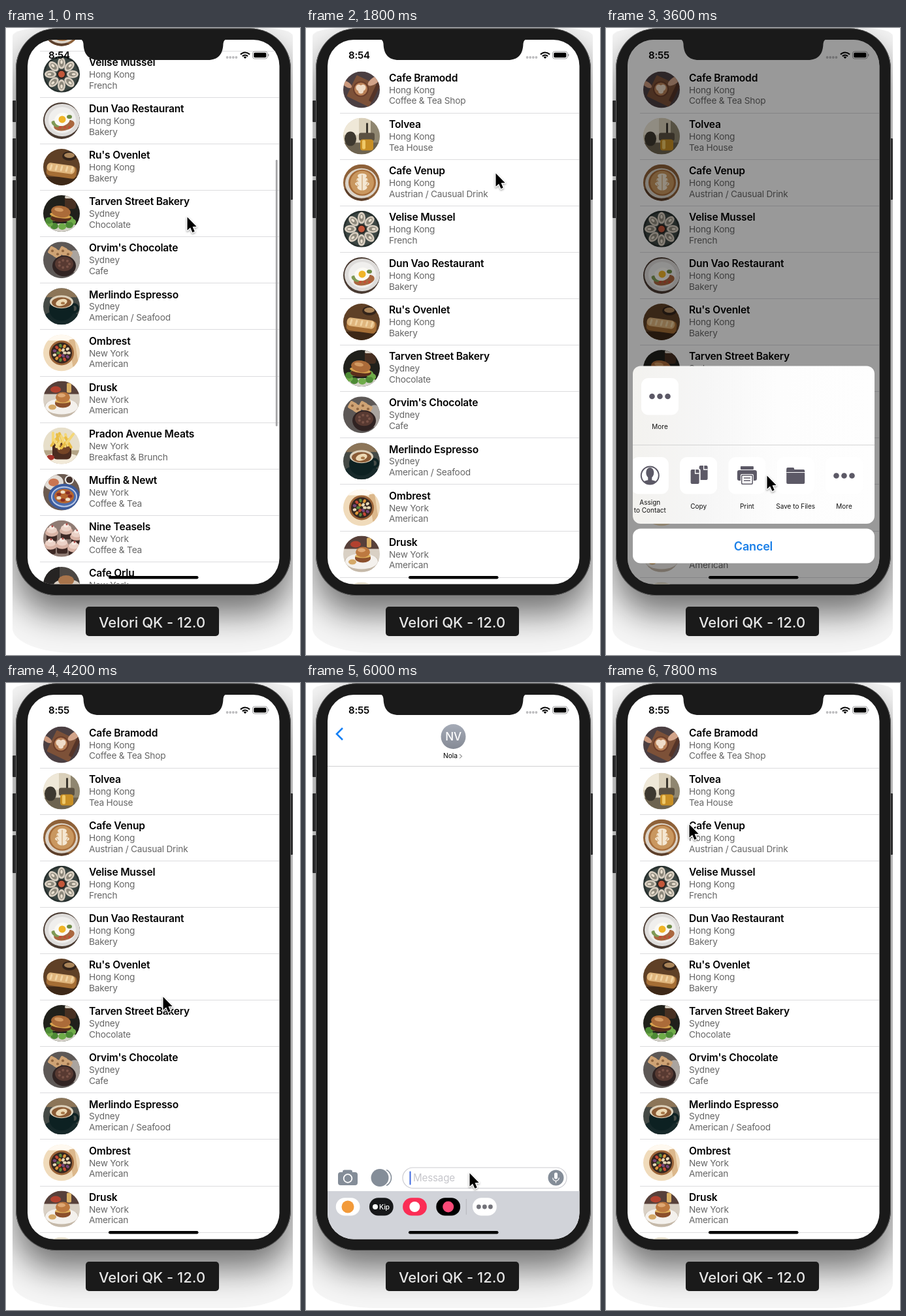
These frames come from a looping animation (450 px wide and 960 px high, 8000 ms). An HTML page with a canvas:

```html
<!DOCTYPE html>
<html lang="en">
<head>
<meta charset="utf-8">
<style>
html, body { margin: 0; width: 100%; height: 100%; overflow: hidden; background: #fff; }
canvas { display: block; }
</style>
</head>
<body>
<canvas id="stage" width="450" height="960"></canvas>
<script>
const ctx = document.getElementById('stage').getContext('2d');
const STEP = 600, LOOP = 8000, ROW = 71.1, DARK = '#1a1a1a', ICON = '#5c5966', SLATE = '#848d98';

// scene, pointer x, pointer y, scroll offset
const steps = [
  ['list', 277, 289, 237], ['list', 243, 222, 16], ['list', 209, 153, 0], ['list', 290, 222, 0],
  ['list', 348, 287, 0], ['share', 300, 690, 0], ['share', 246, 685, 89], ['list', 240, 480, 0],
  ['launch', 235, 283], ['inbox', 240, 290], ['chat', 250, 750], ['chat', 235, 752],
  ['chat', 180, 480], ['list', 127, 216, 0]
];

function disc(color, x, y, rx, ry = rx, turn = 0) {
  ctx.fillStyle = color;
  ctx.beginPath();
  ctx.ellipse(x, y, rx, ry, turn, 0, Math.PI * 2);
  ctx.fill();
}
function box(color, x, y, w, h, r = 0) {
  ctx.fillStyle = color;
  ctx.beginPath();
  ctx.roundRect(x, y, w, h, r);
  ctx.fill();
}
function slab(color, x, y, w, h, turn, r = 2) {
  ctx.save();
  ctx.translate(x, y);
  ctx.rotate(turn);
  box(color, -w / 2, -h / 2, w, h, r);
  ctx.restore();
}
function line(color, width, ...points) {
  ctx.strokeStyle = color;
  ctx.lineWidth = width;
  ctx.beginPath();
  for (let i = 0; i < points.length; i += 2) ctx.lineTo(points[i], points[i + 1]);
  ctx.stroke();
}
function arc(color, width, x, y, r, from = 0, to = Math.PI * 2) {
  ctx.strokeStyle = color;
  ctx.lineWidth = width;
  ctx.beginPath();
  ctx.arc(x, y, r, from, to);
  ctx.stroke();
}
function text(str, x, y, size, weight = 400, color = '#000', align = 'left', spacing = -0.2) {
  ctx.font = `${weight} ${size}px Inter, sans-serif`;
  ctx.letterSpacing = spacing + 'px';
  ctx.fillStyle = color;
  ctx.textAlign = align;
  ctx.fillText(str, x, y);
}
function ringOf(count, radius, draw) {
  for (let i = 0; i < count; i++) {
    const a = i / count * Math.PI * 2;
    draw(Math.cos(a) * radius, Math.sin(a) * radius, a, i);
  }
}
function clipped(x, y, w, h, r, draw) {
  ctx.save();
  ctx.beginPath();
  ctx.roundRect(x, y, w, h, r);
  ctx.clip();
  draw();
  ctx.restore();
}
function dots(color, x, y, r, gap, count = 3) {
  for (let i = 0; i < count; i++) disc(color, x + (i - (count - 1) / 2) * gap, y, r);
}

// Dishes are drawn around (0, 0) inside a circle of radius 28
const dishes = {
  board() {
    box('#4b3f42', -28, -28, 56, 56);
    slab('#7d5138', 2, 2, 38, 36, 0.45);
    slab('#553428', 22, 0, 6, 40, 0.45);
    disc('#d3a48a', 20, -14, 12, 5, -0.6);
    disc('#c9977c', -22, -8, 8, 4, 0.6);
    disc('#6b3d2a', -1, -1, 12);
    disc('#b98057', -1, -1, 10);
    disc('#f0dcc8', -4, -3, 4.5, 5, -0.4);
    disc('#f0dcc8', 2, -3, 4.5, 5, 0.4);
    disc('#f0dcc8', -1, 2, 4, 4);
  },
  tea() {
    box('#d9cfb9', -28, -28, 56, 56);
    box('#efe8d8', -28, -28, 24, 26);
    box('#8f8670', 14, -28, 14, 40);
    box('#6d6350', -28, 10, 56, 18);
    disc('#3d382f', -17, 4, 9, 11);
    box('#3a352d', 7, -20, 3, 18);
    box('#5b5142', -4, -5, 24, 12, 3);
    box('#c88f25', -2, 5, 20, 17, 4);
    box('#f0c968', 1, 6, 5, 14, 2);
  },
  latte() {
    box('#8e6139', -28, -28, 56, 56);
    slab('#5c3f2b', -12, 20, 50, 10, 0.4);
    disc('#dcd4c9', 0, 1, 25, 23);
    disc('#a66c38', 1, 0, 21, 20);
    disc('#c9975f', 1, 0, 18);
    for (let i = 0; i < 4; i++) {
      disc('#f4e7d2', 1, -10 + i * 6, 7 + i * 2 - (i > 2 ? 5 : 0), 4);
      arc('#c9975f', 1, 1, -14 + i * 6, 9, 0.3, 2.8);
    }
    line('#c9975f', 1, 1, -12, 1, 14);
  },
  oysters() {
    box('#28312f', -28, -28, 56, 56);
    disc('#3d4744', 0, 0, 25);
    ringOf(8, 17, (x, y, a) => {
      disc('#d8cec0', x, y, 9, 6, a);
      disc('#8d887b', x, y, 6, 3.5, a);
      disc('#e9dfcf', x * 1.1, y * 1.1, 3, 1.8, a);
    });
    disc('#2a2320', 0, 0, 7);
    disc('#c2573a', 0, 0, 5);
  },
  egg() {
    box('#4a3b32', -28, -28, 56, 56);
    disc('#dedcda', 1, -1, 27, 25);
    disc('#f0efed', 1, -1, 21, 20);
    disc('#a9673f', 4, 7, 16, 8, -0.2);
    disc('#7f9a55', -9, 5, 7, 4, 0.5);
    disc('#fbfaf4', 1, -2, 12, 10, -0.3);
    disc('#f0b428', 1, -2, 5.5);
    dots('#c54d35', 5, 10, 2, 7);
    disc('#6d8b43', 12, -6, 4, 3);
  },
  loaf() {
    box('#5f4026', -28, -28, 56, 56);
    box('#3d2817', -28, 15, 56, 13);
    disc('#33241a', 12, -17, 11, 7);
    disc('#a98459', 12, -18, 8, 4);
    slab('#a56e35', 0, 6, 46, 19, 0.14, 6);
    slab('#e0b67d', -1, 2, 43, 13, 0.14, 6);
    for (let i = -2; i < 3; i++) slab('#f0d3a3', i * 8, 2 + i, 3, 9, 0.3);
  },
  burger() {
    box('#20201b', -28, -28, 56, 56);
    box('#473022', 5, -27, 17, 20, 4);
    box('#d8d2c6', 5, -27, 17, 4, 2);
    disc('#d5d2c9', 2, 22, 26, 7);
    ringOf(9, 14, (x, y, a, i) => disc(i % 2 ? '#4d8a35' : '#6fac49', x * 1.3 - 2, 13 + y * 0.5, 6, 5));
    disc('#5a2e1c', -1, 7, 16, 6);
    disc('#d7a24c', -2, 3, 16, 4, 0.15);
    disc('#ab6b39', -1, -3, 15, 9, 0.15);
    disc('#d39a62', -4, -6, 7, 3, 0.15);
  },
  chocolate() {
    box('#5d5856', -28, -28, 56, 56);
    disc('#aaa49f', 20, 2, 12, 17);
    for (let i = 0; i < 4; i++) {
      slab('#cfa374', -14 + i * 8, -14 + i % 2 * 5, 11, 12, 0.5);
      disc('#8f6540', -14 + i * 8, -14 + i % 2 * 5, 2);
    }
    disc('#302322', 4, 9, 18, 16);
    disc('#583a32', 4, 6, 14, 11);
    ringOf(7, 8, (x, y) => disc('#795347', 4 + x, 6 + y * 0.7, 2));
  },
  espresso() {
    box('#454a46', -28, -28, 56, 56);
    box('#8c7558', -28, -28, 56, 14);
    disc('#17292a', 0, 17, 27, 11);
    disc('#0d2122', 0, 4, 19, 18);
    arc('#0d2122', 4, 19, 3, 6);
    disc('#ded2bc', 0, -7, 18, 10);
    disc('#8a5b35', 0, -6, 15, 8);
    disc('#edd9b4', 0, -6, 9, 5, -0.3);
    disc('#a77747', 2, -5, 3, 2);
  },
  bowl() {
    box('#f0dbbb', -28, -28, 56, 56);
    box('#fff9f0', -28, -28, 56, 9);
    slab('#dcb88b', 19, 2, 9, 46, -0.15);
    disc('#9b6438', 0, 0, 19);
    disc('#35261f', 0, 0, 16);
    const bits = ['#c74735', '#e8d9b5', '#5c873e', '#764778', '#dc963a'];
    for (const [n, r] of [[6, 5], [11, 11]])
      ringOf(n, r, (x, y, a, i) => disc(bits[(i * 2 + n) % 5], x, y, 2.8, 2.2, a));
  },
  slider() {
    box('#d9d0c4', -28, -28, 56, 56);
    box('#57403a', -28, -28, 56, 20);
    disc('#b2412f', -9, -15, 8, 5);
    box('#dcb267', 8, -25, 7, 15, 2);
    disc('#c5b9a9', 0, 13, 27, 14);
    disc('#f4f1ed', 0, 11, 25, 12);
    disc('#8b4f2b', 2, 6, 12, 7);
    disc('#e1b45d', 2, 3, 12, 3);
    disc('#bd7940', 2, -3, 11, 8);
    disc('#dfa975', 0, -6, 6, 3);
    disc('#d5a968', -14, 12, 6, 4);
  },
  fries() {
    box('#e7dfca', -28, -28, 56, 56);
    box('#b4a486', -28, 7, 56, 21);
    disc('#f2ead9', 0, 20, 27, 9);
    box('#4c2c20', -14, -5, 29, 26, 7);
    disc('#754426', 3, 5, 10, 8);
    for (let i = 0; i < 11; i++)
      slab(i % 2 ? '#e9bd45' : '#f4d778', -13 + i * 2.6, -11 + i * 7 % 5 * 2, 4, 21, Math.sin(i * 2) * 0.7);
    disc('#a8342c', -17, 18, 6, 4);
  },
  waffle() {
    box('#6b5a50', -28, -28, 56, 56);
    disc('#e3ddd6', -12, -15, 15, 12);
    disc('#ca7552', -12, -15, 8, 6);
    disc('#f2f0ed', 12, -19, 7);
    disc('#42302a', 12, -19, 5);
    disc('#3c5b9c', 4, 7, 24, 20);
    disc('#b9c8e6', 4, 7, 20, 16);
    disc('#4a6cae', 4, 7, 18, 14);
    disc('#b6652f', 4, 6, 15, 11);
    ringOf(7, 9, (x, y, a, i) => disc(i % 2 ? '#f0dfc4' : '#8a2f25', 4 + x, 6 + y * 0.7, 3.5, 2.5));
  },
  cupcakes() {
    box('#8f7b73', -28, -28, 56, 56);
    for (const [x, y] of [[-15, -12], [7, -15], [23, -6], [-17, 8], [1, 7], [19, 12]]) {
      box('#3e2925', x - 8, y + 3, 16, 13, 3);
      disc('#d9b4a6', x, y + 3, 10, 6);
      disc('#ecd2c7', x, y - 1, 8, 5);
      disc('#f7e9e1', x, y - 5, 4, 3);
      disc('#ad4845', x + 1, y - 7, 1.6);
    }
  },
  counter() {
    box('#4c4743', -28, -28, 56, 56);
    box('#262423', -28, -28, 25, 32);
    disc('#d8cfc3', 8, 0, 20, 9);
    disc('#a8744b', 7, -7, 12, 8);
    box('#e8e3db', -28, 10, 56, 18);
  }
};

const rows = [
  ['board', 'Cafe Bramodd', 'Hong Kong', 'Coffee & Tea Shop'],
  ['tea', 'Tolvea', 'Hong Kong', 'Tea House'],
  ['latte', 'Cafe Venup', 'Hong Kong', 'Austrian / Causual Drink'],
  ['oysters', 'Velise Mussel', 'Hong Kong', 'French'],
  ['egg', 'Dun Vao Restaurant', 'Hong Kong', 'Bakery'],
  ['loaf', "Ru's Ovenlet", 'Hong Kong', 'Bakery'],
  ['burger', 'Tarven Street Bakery', 'Sydney', 'Chocolate'],
  ['chocolate', "Orvim's Chocolate", 'Sydney', 'Cafe'],
  ['espresso', 'Merlindo Espresso', 'Sydney', 'American / Seafood'],
  ['bowl', 'Ombrest', 'New York', 'American'],
  ['slider', 'Drusk', 'New York', 'American'],
  ['fries', 'Pradon Avenue Meats', 'New York', 'Breakfast & Brunch'],
  ['waffle', 'Muffin & Newt', 'New York', 'Coffee & Tea'],
  ['cupcakes', 'Nine Teasels', 'New York', 'Coffee & Tea'],
  ['counter', 'Cafe Orlu', 'New York', 'Coffee & Tea']
];

function drawList(scroll) {
  rows.forEach(([dish, title, city, kind], i) => {
    const y = 59 + i * ROW - scroll;
    if (y < -ROW || y > 860) return;
    ctx.save();
    ctx.translate(85, y + 35.5);
    clipped(-28, -28, 56, 56, 28, dishes[dish]);
    ctx.restore();
    text(title, 127, y + 22.7, 15.6, 600);
    text(city, 127, y + 40.6, 13.7, 400, '#666');
    text(kind, 127, y + 57.4, 13.7, 400, '#666');
    box('#dcdcde', 52, Math.floor(y + ROW), 366, 1);
  });
  if (scroll) box('#a4a4a6', 412.8, 62 + scroll * 0.59, 2.8, 408, 1.4);
}

function drawStatus(clock, y = 0) {
  text(clock, 65, 47 + y, 15, 600);
  dots('#bdbdbf', 345.5, 45 + y, 1.9, 4.6, 4);
  for (const r of [1.6, 5.5, 9.5]) arc('#000', r < 2 ? 3.2 : 2.2, 366, 47 + y, r, -2.4, -0.74);
  ctx.strokeStyle = '#9a9a9c';
  ctx.lineWidth = 1;
  ctx.beginPath();
  ctx.roundRect(377.5, 36 + y, 22.5, 11, 3);
  ctx.stroke();
  box('#000', 379.3, 37.8 + y, 19, 7.4, 1.6);
  box('#9a9a9c', 401, 39.5 + y, 1.4, 4, 0.7);
}

const actions = [
  ['Save Image', x => {
    box(ICON, x - 11, 676, 22, 20, 3);
    line('#fff', 2, x, 679, x, 691);
    line('#fff', 2, x - 4, 687, x, 691, x + 4, 687);
  }],
  ['Assign|to Contact', x => {
    clipped(x - 14, 671, 28, 28, 14, () => {
      disc(ICON, x, 681, 6, 8);
      box(ICON, x - 3, 686, 6, 7);
      disc(ICON, x, 698, 12, 6);
    });
    arc(ICON, 2, x, 685, 13.5);
  }],
  ['Copy', x => {
    for (const [dx, y] of [[1, 670], [-12, 676]]) {
      box('#fff', x + dx - 1, y - 1, 16, 24, 2);
      box(ICON, x + dx, y, 13, 22, 2);
      line('#fff', 1.3, x + dx + 7, y, x + dx + 7, y + 6, x + dx + 13, y + 6);
    }
  }],
  ['Print', x => {
    box(ICON, x - 10, 671, 20, 5, 1);
    box(ICON, x - 15, 677, 30, 16, 3);
    box('#fff', x - 10, 683, 20, 17, 2);
    box(ICON, x - 9, 684, 18, 15, 2);
    box('#fff', x - 7.5, 685.5, 15, 12, 1);
    line(ICON, 1.4, x - 5, 689, x + 5, 689);
    line(ICON, 1.4, x - 5, 693, x + 5, 693);
  }],
  ['Save to Files', x => {
    box(ICON, x - 14, 673, 12, 10, 2);
    box(ICON, x - 14, 676, 28, 6, 2);
    box(ICON, x - 14, 680, 28, 18, 2);
    line('#fff', 1, x - 14, 680.5, x + 14, 680.5);
  }],
  ['More', x => dots(ICON, x, 685.5, 4.3, 12)]
];

function drawSheet(scroll) {
  box('rgba(0,0,0,.4)', 33, 18, 386, 834);
  const fill = ctx.createLinearGradient(41, 0, 411, 0);
  fill.addColorStop(0, '#f3f2ef');
  fill.addColorStop(0.3, '#f6f6f6');
  fill.addColorStop(0.6, '#fdfdfd');
  fill.addColorStop(1, '#fefefe');
  box(fill, 41, 517.5, 370, 241.5, 12);
  clipped(41, 517.5, 370, 241.5, 12, () => {
    box('#fff', 54, 536, 57, 56.5, 11);
    dots(ICON, 82.5, 564, 4.3, 12);
    text('More', 82.5, 614, 10, 400, '#111', 'center', 0);
    box('#d4d4d4', 41, 638, 370, 1);
    actions.forEach(([label, icon], i) => {
      const x = 82 + i * 74.3 - scroll;
      box('#fff', x - 28.5, 657, 57, 56.5, 11);
      icon(x);
      const lines = label.split('|');
      lines.forEach((part, n) =>
        text(part, x, 735.5 + (n - (lines.length - 1) / 2) * 12, 10, 400, '#111', 'center', 0));
    });
  });
  box('#fff', 41, 766.5, 370, 53, 12);
  text('Cancel', 225.5, 800, 18, 600, '#1a7fe8', 'center');
}

function drawLaunch() {
  box('#0b1830', 33, 18, 386, 834);
  box('#fff', 34.3, 21.5, 383, 828.5, 40);
  box('#d2d2d4', 34, 102.5, 383, 1.2);
}

function drawChat() {
  box('#d0d0d2', 33, 127, 386, 1);
  line('#1580f5', 2.6, 56, 69, 47, 78, 56, 87);
  const shade = ctx.createLinearGradient(0, 63, 0, 101);
  shade.addColorStop(0, '#a5abb7');
  shade.addColorStop(1, '#858a95');
  disc(shade, 225.5, 82, 19);
  text('NV', 225.5, 88.3, 17, 500, '#fff', 'center');
  text('Nola', 221, 115.3, 10.3, 400, '#000', 'center', 0);
  line('#999', 1.2, 235, 109, 238.5, 112.2, 235, 115.4);

  box(SLATE, 49, 749, 30, 20, 4);
  box(SLATE, 56, 745.5, 15, 8, 3);
  arc('#fff', 1.8, 64, 758.5, 6.3);
  disc(SLATE, 113, 757.5, 13.5);
  arc(SLATE, 1.6, 117, 757.5, 13.5, -1.1, 1.1);

  ctx.strokeStyle = '#cbcbd0';
  ctx.lineWidth = 1.2;
  ctx.beginPath();
  ctx.roundRect(148, 742, 251, 31.5, 15.7);
  ctx.stroke();
  text('Message', 164, 763.3, 15.2, 400, '#c6c6cb');
  box('#3c68e0', 158.5, 747.5, 2, 21, 1);
  disc(SLATE, 382.5, 757.5, 12);
  box('#fff', 380, 749.5, 5, 10, 2.5);
  arc('#fff', 1.2, 382.5, 757.5, 4.8, 0, Math.PI);
  line('#fff', 1.2, 382.5, 762, 382.5, 765.5);

  box('#d1d3d9', 33, 778, 386, 74);
  ['#fff', '#17181a', '#fb2d55', '#000'].forEach((c, i) => box(c, 45.7 + i * 51.2, 788.3, 36.8, 27.2, 13.6));
  disc('#f29a3a', 64, 802, 9.5);
  disc('#fff', 106, 802, 4);
  text('Kip', 112, 805.8, 10.5, 500, '#fff');
  disc('#fff', 166.3, 802, 8);
  disc('#fb4a78', 217.7, 802, 8.5);
  box('#b5b7bd', 244.8, 790, 1, 24);
  box('#fff', 255, 788.3, 36.8, 27.2, 13.6);
  dots('#727279', 273.4, 802, 3.4, 9);
}

function drawBody() {
  const top = { x: 45, y: 12 }, bottom = { x: 95, y: 38 };
  clipped(10, 0, 429, 957, [top, top, bottom, bottom], () => {
    box('#f6f6f6', 10, 0, 429, 957);
    ctx.shadowColor = 'rgba(0,0,0,.55)';
    ctx.shadowBlur = 52;
    ctx.shadowOffsetY = 28;
    box(DARK, 15, 0.5, 421, 868.5, 62);
    ctx.shadowColor = 'transparent';
    for (const [y, h] of [[111, 33], [169, 58], [233, 58]]) box('#2b2b2c', 10, y, 7, h, 1);
    box('#2b2b2c', 433, 169, 6, 94, 1);
    box('#666', 15, 0.5, 421, 868.5, 62);
    box(DARK, 16, 1.2, 419, 867, 61);
  });
  box(DARK, 122, 886, 204, 45, 5);
  text('Velori QK - 12.0', 223.5, 917.7, 22, 500, '#e6e6e6', 'center', 0);
}

function drawNotch() {
  ctx.fillStyle = DARK;
  ctx.beginPath();
  ctx.moveTo(113, 17);
  ctx.quadraticCurveTo(118, 18, 118.5, 24);
  ctx.bezierCurveTo(119, 40, 126, 49, 142, 49);
  ctx.lineTo(309, 49);
  ctx.bezierCurveTo(325, 49, 332, 40, 332.5, 24);
  ctx.quadraticCurveTo(333, 18, 338, 17);
  ctx.fill();
}

function drawPointer(x, y) {
  ctx.save();
  ctx.translate(x + 0.5, y + 0.5);
  ctx.scale(0.92, 0.92);
  ctx.beginPath();
  for (const p of [[0, 0], [0, 22], [5, 17.4], [8.6, 25.6], [12.2, 24], [8.8, 16], [15.4, 15.8]]) ctx.lineTo(...p);
  ctx.closePath();
  ctx.lineJoin = 'round';
  ctx.strokeStyle = '#fff';
  ctx.lineWidth = 3;
  ctx.shadowColor = 'rgba(0,0,0,.35)';
  ctx.shadowBlur = 3;
  ctx.shadowOffsetY = 1.5;
  ctx.stroke();
  ctx.shadowColor = 'transparent';
  ctx.fillStyle = '#000';
  ctx.fill();
  ctx.restore();
}

function draw(step) {
  const [scene, x, y, scroll] = steps[step];
  const shift = scene === 'launch' ? 2.7 : 0;
  ctx.clearRect(0, 0, 450, 960);
  drawBody();
  clipped(33, 18, 385.5, 833.5, 40, () => {
    box('#fff', 33, 18, 386, 834);
    if (scene === 'list') drawList(scroll);
    if (scene === 'share') drawList(0);
    if (scene === 'launch') drawLaunch();
    if (scene === 'inbox') box('#d2d2d4', 33, 101, 386, 1);
    if (scene === 'chat') drawChat();
    drawStatus(step < 5 ? '8:54' : '8:55', shift);
    if (scene === 'share') drawSheet(scroll);
    box('#000', 157, 839 + shift / 3, 137.5, 4.6, 2.3);
  });
  drawNotch();
  drawPointer(x, y);
}

function tick() {
  draw(Math.floor(performance.now() % LOOP / STEP));
  requestAnimationFrame(tick);
}
tick();
</script>
</body>
</html>
```
